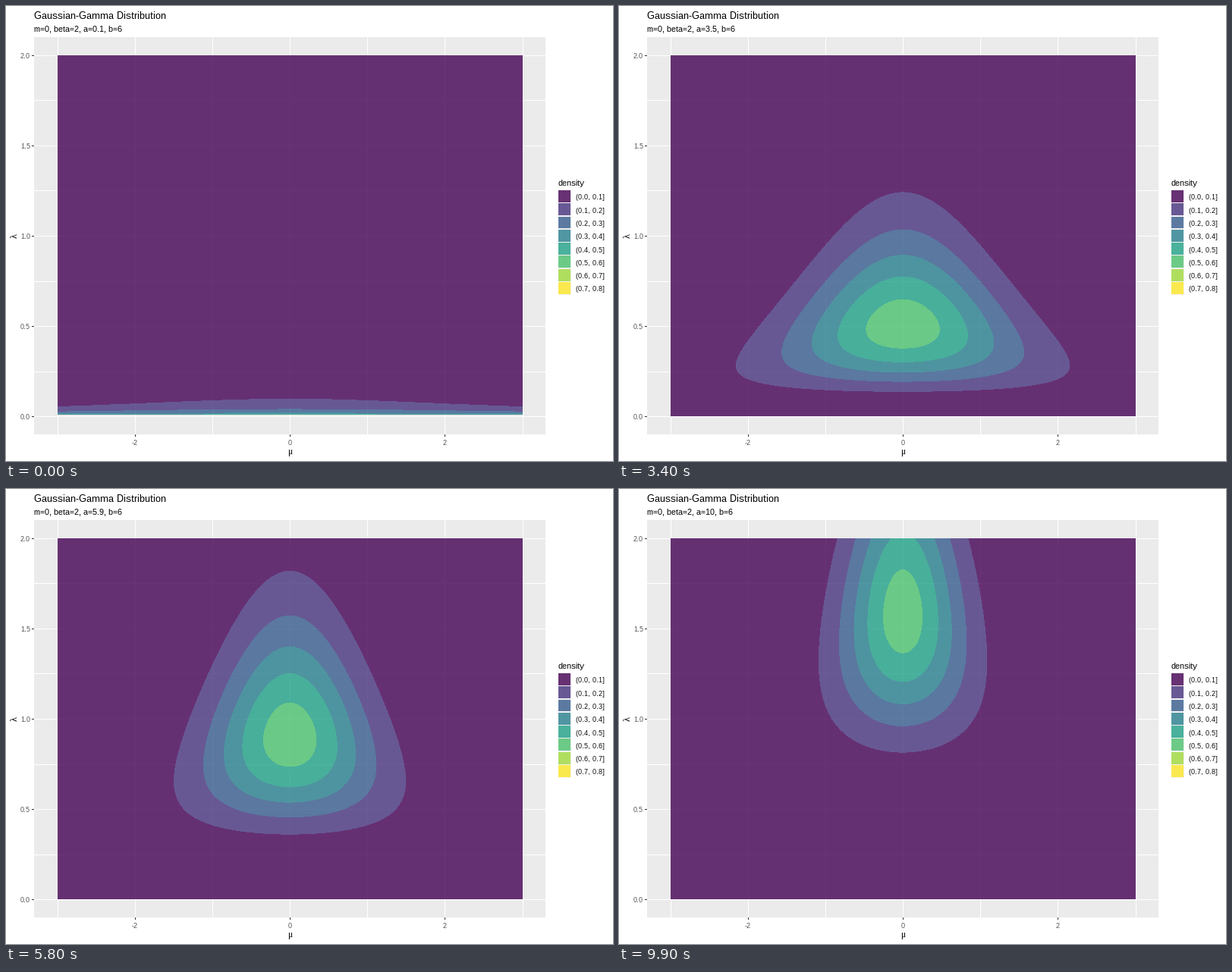
A matplotlib script for the animation above (10 s loop, 800 by 600 pixels).

```python
import math

import matplotlib.pyplot as plt
import numpy as np
from matplotlib.animation import FuncAnimation
from matplotlib.colors import BoundaryNorm, ListedColormap
from matplotlib.patches import Rectangle

W, H, DPI = 800, 600, 100
FRAMES, STEP_MS = 100, 100
M, BETA, B = 0, 2, 6
ALPHA = 0.8
COLORS = ["#440154", "#46337E", "#365C8D", "#277F8E",
          "#1FA187", "#4AC16D", "#9FDA3A", "#FDE725"]
LEFT, TOP, RIGHT, BOTTOM = 37, 41, 711, 565
MU0, MU_SCALE = 374.1, 102.17
LAM0, LAM_SCALE = 541.2, 238.2

plt.rcParams.update({"font.family": "Liberation Sans",
                     "text.hinting": "native",
                     "text.hinting_factor": 1})

fig = plt.figure(figsize=(W / DPI, H / DPI), dpi=DPI, facecolor="white")
ax = fig.add_axes([0, 0, 1, 1])
ax.axis("off")


def px(mu):
    return round(MU0 + MU_SCALE * mu)


def py(lam):
    return round(LAM0 - LAM_SCALE * lam)


def label(x, y, s, size, color="black", **kw):
    return ax.text(x, y, s, fontsize=size * 72 / DPI, color=color,
                   va="baseline", **kw)


def rect(x0, y0, x1, y1, color, **kw):
    ax.add_patch(Rectangle((x0, y0), x1 - x0, y1 - y0, facecolor=color,
                           linewidth=0, antialiased=False, **kw))


def hline(y, x0, x1, color):
    rect(x0, y, x1, y + 1, color, zorder=0.5)


def vline(x, y0, y1, color):
    rect(x, y0, x + 1, y1, color, zorder=0.5)


def draw_panel():
    rect(LEFT, TOP, RIGHT, BOTTOM, "#EBEBEB", zorder=0)
    for mu in range(-3, 4):
        vline(px(mu), TOP, BOTTOM, "white")
    for lam in np.arange(0, 2.1, 0.25):
        hline(py(lam), LEFT, RIGHT, "white")
    for mu in (-2, 0, 2):
        vline(px(mu), BOTTOM, BOTTOM + 3, "#333333")
        label(px(mu), 579, str(mu), 9, "#4D4D4D", ha="center")
    for lam in np.arange(0, 2.1, 0.5):
        hline(py(lam), LEFT - 3, LEFT, "#333333")
        label(32, py(lam) + 4, f"{lam:.1f}", 9, "#4D4D4D", ha="right")
    label(374, 591, "\u03bc", 12, ha="center", family="Liberation Serif")
    label(15, 303, "\u03bb", 12, ha="center", family="Liberation Serif",
          rotation=90, rotation_mode="anchor")


def draw_legend():
    x, y, key, inset = 727.7, 242.35, 17.28, 0.7
    label(728, 237, "density", 11)
    rect(x, y, x + key, y + key * len(COLORS), "#F2F2F2")
    for i, color in enumerate(COLORS):
        top = y + i * key
        rect(x + inset, top + inset, x + key - inset, top + key - inset,
             color, alpha=ALPHA)
        label(751, top + key / 2 + 4.5,
              f"({i / 10:.1f}, {(i + 1) / 10:.1f}]", 9)


draw_panel()
draw_legend()
label(37, 17, "Gaussian-Gamma Distribution", 13)
subtitle = label(37, 34, "", 11)

# one sample per pixel centre; lambda is interpolated on a 0.01 grid
x0, x1, y0, y1 = px(-3), px(3), py(2), py(0)
mus = (np.arange(x0, x1) + 0.5 - MU0) / MU_SCALE
rows = (LAM0 - np.arange(y0, y1) - 0.5) / LAM_SCALE
lams = np.linspace(0, 2, 201)
cell = np.clip((rows * 100).astype(int), 0, 199)
frac = (rows * 100 - cell)[:, None]

levels = np.arange(9) / 10
bands = ax.imshow(np.zeros((len(rows), len(mus))),
                  extent=(x0, x1, y1, y0), aspect="auto",
                  interpolation="nearest", cmap=ListedColormap(COLORS),
                  norm=BoundaryNorm(levels, len(COLORS)),
                  alpha=ALPHA, zorder=1)
ax.set_xlim(0, W)
ax.set_ylim(H, 0)


def density(mu, lam, a):
    normal = (np.sqrt(BETA * lam / (2 * np.pi))
              * np.exp(-BETA * lam * (mu - M) ** 2 / 2))
    gamma = B ** a / math.gamma(a) * lam ** (a - 1) * np.exp(-B * lam)
    return normal * gamma


def update(i):
    a = (i + 1) / 10
    # the density is undefined at lambda = 0 when a < 1
    with np.errstate(divide="ignore", invalid="ignore"):
        grid = density(mus[None, :], lams[:, None], a)
    z = grid[cell] * (1 - frac) + grid[cell + 1] * frac
    bands.set_data(np.ma.masked_invalid(z))
    subtitle.set_text(f"m={M}, beta={BETA}, a={a:g}, b={B}")
    return bands, subtitle


anim = FuncAnimation(fig, update, frames=FRAMES, interval=STEP_MS,
                     repeat=True, repeat_delay=0, blit=False)
plt.show()
```
